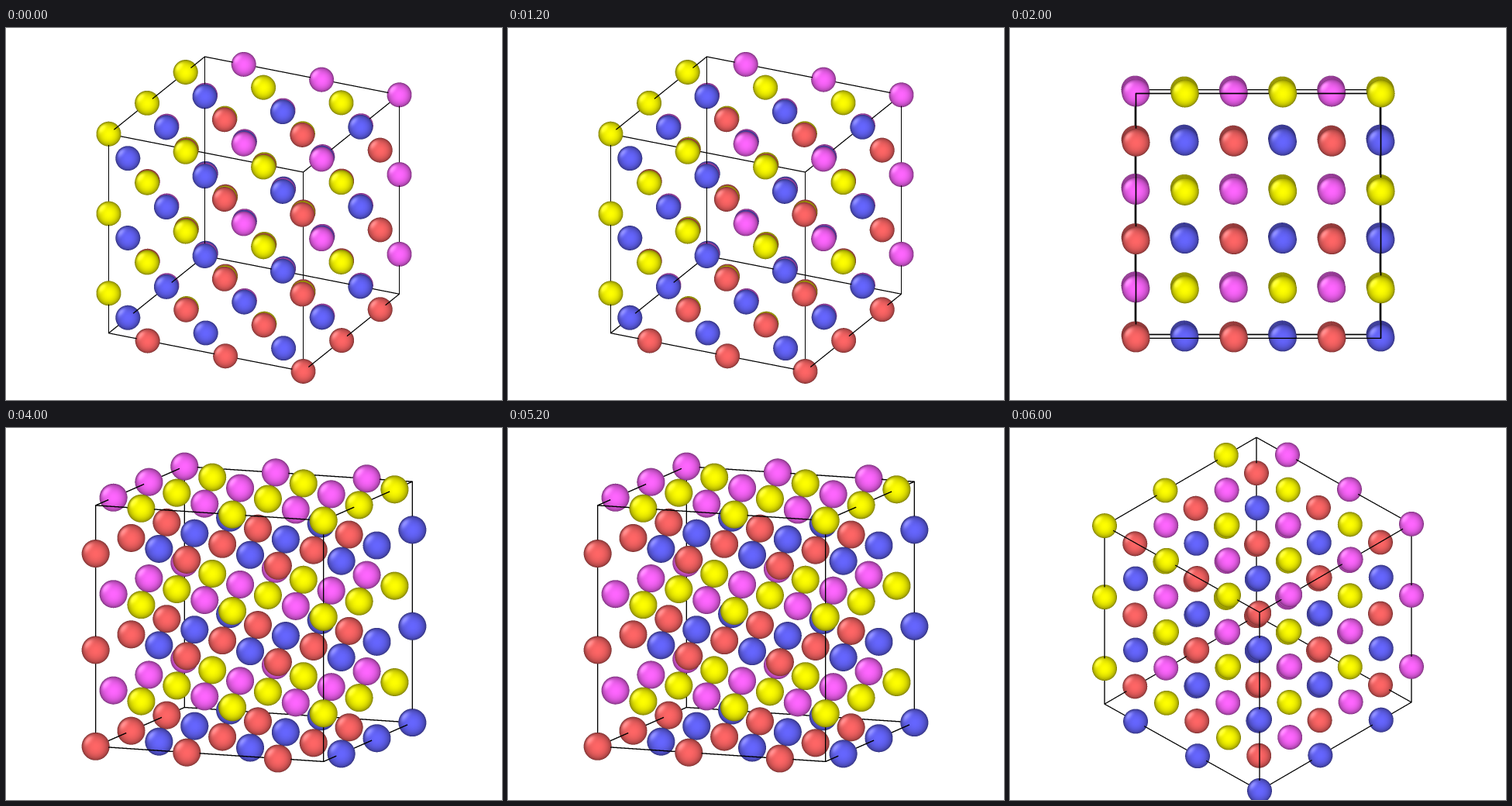
A matplotlib script that plays this animation: 640 px wide and 480 px high, repeating every 8000 ms.

```python
from itertools import product

import matplotlib.pyplot as plt
import numpy as np
from matplotlib.animation import FuncAnimation

WIDTH, HEIGHT, SS = 640, 480, 3
CELLS = 5              # box edge in half lattice steps
RADIUS = 0.057         # atom radius relative to the box edge
LINE_RADIUS = 0.0022   # box line radius relative to the box edge

# Atom colour by parity of its lattice indices
COLORS = {
    (0, 0, 0): (1, 0.4, 0.4),
    (1, 1, 0): (0.4, 0.4, 1),
    (1, 0, 1): (1, 1, 0),
    (0, 1, 1): (1, 0.4, 1),
}

# Azimuth and elevation in degrees, box edge in pixels
VIEWS = [
    (153.71, -23.4, 280),
    (-0.18, 0.9, 316),
    (21.3, 9.85, 315.6),
    (134.42, 34.75, 280),
]

LIGHT = np.array([-1.8, 1.5, -0.2])
LIGHT /= np.linalg.norm(LIGHT)


def view_matrix(azimuth, elevation):
    """Rows: screen right, screen up, towards the viewer."""
    ca, sa = np.cos(np.radians(azimuth)), np.sin(np.radians(azimuth))
    ce, se = np.cos(np.radians(elevation)), np.sin(np.radians(elevation))
    return np.array([
        [ca, sa, 0],
        [-se * sa, se * ca, ce],
        [sa * ce, -ca * ce, se],
    ])


def shade(nx, ny, nz, color):
    facing = nx * LIGHT[0] + ny * LIGHT[1] + nz * LIGHT[2]
    mirror = np.clip(2 * facing * nz - LIGHT[2], 0, 1)
    diffuse = (0.4 + 0.6 * nz)[..., None] * np.array(color)
    return np.clip(diffuse + 0.25 * mirror[..., None] ** 6, 0, 1)


class Canvas:
    """Supersampled image with a depth buffer."""

    def __init__(self):
        self.rgb = np.ones((HEIGHT * SS, WIDTH * SS, 3))
        self.depth = np.full((HEIGHT * SS, WIDTH * SS), -np.inf)

    def window(self, x0, x1, y0, y1):
        left, right = max(0, int(x0 * SS) - 1), min(WIDTH * SS, int(x1 * SS) + 2)
        top, bottom = max(0, int(y0 * SS) - 1), min(HEIGHT * SS, int(y1 * SS) + 2)
        ys, xs = np.mgrid[top:bottom, left:right]
        area = (slice(top, bottom), slice(left, right))
        return area, (xs + 0.5) / SS, (ys + 0.5) / SS

    def paint(self, area, mask, depth, color):
        mask = mask & (depth > self.depth[area])
        self.depth[area][mask] = depth[mask]
        self.rgb[area][mask] = color[mask] if np.ndim(color) > 1 else color

    def sphere(self, center, radius, color):
        x, y, z = center
        area, px, py = self.window(x - radius, x + radius, y - radius, y + radius)
        nx, ny = (px - x) / radius, (y - py) / radius
        flat = nx ** 2 + ny ** 2
        nz = np.sqrt(np.clip(1 - flat, 0, 1))
        self.paint(area, flat <= 1, z + radius * nz, shade(nx, ny, nz, color))

    def line(self, start, end, radius):
        low = np.minimum(start, end) - radius
        high = np.maximum(start, end) + radius
        area, px, py = self.window(low[0], high[0], low[1], high[1])
        dx, dy, dz = end - start
        t = ((px - start[0]) * dx + (py - start[1]) * dy) / (dx * dx + dy * dy)
        t = np.clip(t, 0, 1)
        gap = np.hypot(px - start[0] - t * dx, py - start[1] - t * dy)
        self.paint(area, gap <= radius, start[2] + t * dz + radius, (0, 0, 0))

    def image(self):
        return self.rgb.reshape(HEIGHT, SS, WIDTH, SS, 3).mean(axis=(1, 3))


def render(azimuth, elevation, edge):
    matrix = view_matrix(azimuth, elevation)
    canvas = Canvas()

    def project(site):
        x, y, z = matrix @ (np.array(site) / CELLS - 0.5) * edge
        return np.array([WIDTH / 2 + x, HEIGHT / 2 - y, z])

    for site in product(range(CELLS + 1), repeat=3):
        color = COLORS.get(tuple(n % 2 for n in site))
        if color:
            canvas.sphere(project(site), RADIUS * edge, color)

    for corner in product((0, CELLS), repeat=3):
        for axis in range(3):
            if corner[axis] == 0:
                other = list(corner)
                other[axis] = CELLS
                canvas.line(project(corner), project(other), LINE_RADIUS * edge)
    return canvas.image()


fig = plt.figure(figsize=(WIDTH / 100, HEIGHT / 100), dpi=100, facecolor="white")
ax = fig.add_axes([0, 0, 1, 1])
ax.axis("off")
picture = ax.imshow(np.ones((HEIGHT, WIDTH, 3)), aspect="auto",
                    interpolation="nearest")


def update(frame):
    picture.set_data(render(*VIEWS[frame]))
    return [picture]


anim = FuncAnimation(fig, update, frames=len(VIEWS), interval=2000,
                     init_func=lambda: update(0), repeat=True, repeat_delay=0)
plt.show()
```
